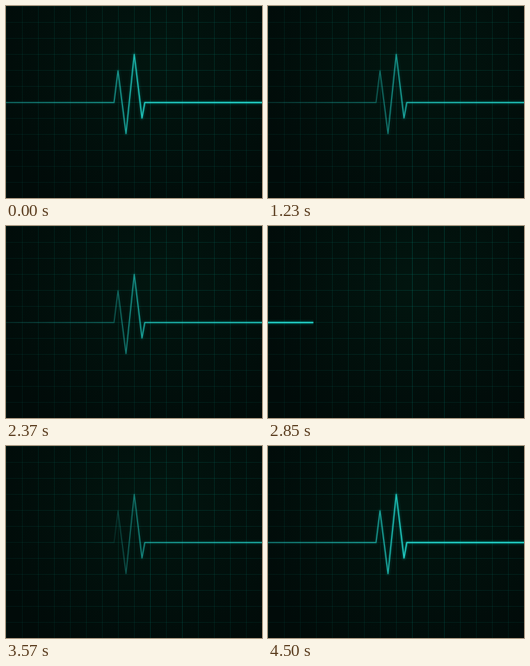
Recreate the animation shown at these times as an HTML page with a canvas. Size 320 by 240 pixels, loop 4.53 s.

```html
<!DOCTYPE html>
<html>
<head>
<meta charset="utf-8">
<title>Heartbeat</title>
<style>
html, body { margin: 0; height: 100%; overflow: hidden; background: #010b09; }
canvas { display: block; }
</style>
</head>
<body>
<canvas id="stage" width="320" height="240"></canvas>
<script>
const ctx = document.getElementById('stage').getContext('2d');
const LOOP = 4530, BEAT = LOOP / 4, FIRST_BEAT = 535, SPEED = 1.13;
const points = [[-1, 120.7], [135, 120.7], [140, 81], [150, 159.5], [160.3, 60.5],
  [170, 140], [173.5, 120.7], [321, 120.7]];

const legs = points.slice(1).map(([x, y], i) => {
  const [px, py] = points[i];
  return { px, py, x, y, length: Math.hypot(x - px, y - py) };
});

const clamp = v => Math.max(0, Math.min(1, v));

// Brightness at a distance along the trace; the start fades first.
function brightness(distance, age) {
  const start = 250 + 0.6 * distance, end = 720 + 0.53 * distance;
  return clamp((end - age) / (end - start)) ** 0.7;
}

// The trace only moves rightwards, so a horizontal gradient follows it.
function traceGradient(age, color, strength, power) {
  const gradient = ctx.createLinearGradient(-1, 0, 321, 0);
  let travelled = 0;
  for (const { px, x, length } of legs) {
    for (let k = 0; k <= 4; k++) {
      const u = k / 4;
      const alpha = strength * brightness(travelled + u * length, age) ** power;
      gradient.addColorStop(clamp((px + u * (x - px) + 1) / 322), `rgba(${color},${alpha.toFixed(4)})`);
    }
    travelled += length;
  }
  return gradient;
}

function tracePath(distance) {
  const path = new Path2D();
  path.moveTo(...points[0]);
  for (const { px, py, x, y, length } of legs) {
    if (distance <= 0) break;
    const u = Math.min(1, distance / length);
    path.lineTo(px + u * (x - px), py + u * (y - py));
    distance -= length;
  }
  return path;
}

function radial(x, y, radius, inner, outer) {
  const gradient = ctx.createRadialGradient(x, y, 0, x, y, radius);
  gradient.addColorStop(0, inner);
  gradient.addColorStop(1, outer);
  return gradient;
}

function drawBackground() {
  ctx.fillStyle = radial(180, 70, 210, '#02150f', '#010b09');
  ctx.fillRect(0, 0, 320, 240);
  ctx.fillStyle = radial(200, 70, 210, 'rgba(0,130,115,.22)', 'rgba(0,130,115,.1)');
  for (let x = 0; x < 320; x += 20) ctx.fillRect(x, 0, 1, 240);
  for (let y = 0; y < 240; y += 20) ctx.fillRect(0, y, 320, 1);
  ctx.fillStyle = 'rgba(0,130,115,.1)';
  for (const x of [180, 220]) ctx.fillRect(x, 0, 1, 240);
}

function drawTrace(age) {
  const path = tracePath(age * SPEED);
  const layers = [
    [7, '0,200,185', 0.07, 2],
    [4, '0,210,195', 0.15, 2],
    [2.2, '10,220,210', 0.4, 2],
    [1.2, '45,235,225', 0.9, 1]
  ];
  ctx.lineJoin = 'round';
  for (const [width, color, strength, power] of layers) {
    ctx.lineWidth = width;
    ctx.strokeStyle = traceGradient(age, color, strength, power);
    ctx.stroke(path);
  }
}

function draw() {
  const time = performance.now() % LOOP;
  drawBackground();
  drawTrace((time - FIRST_BEAT + LOOP) % BEAT);
  requestAnimationFrame(draw);
}
draw();
</script>
</body>
</html>
```
